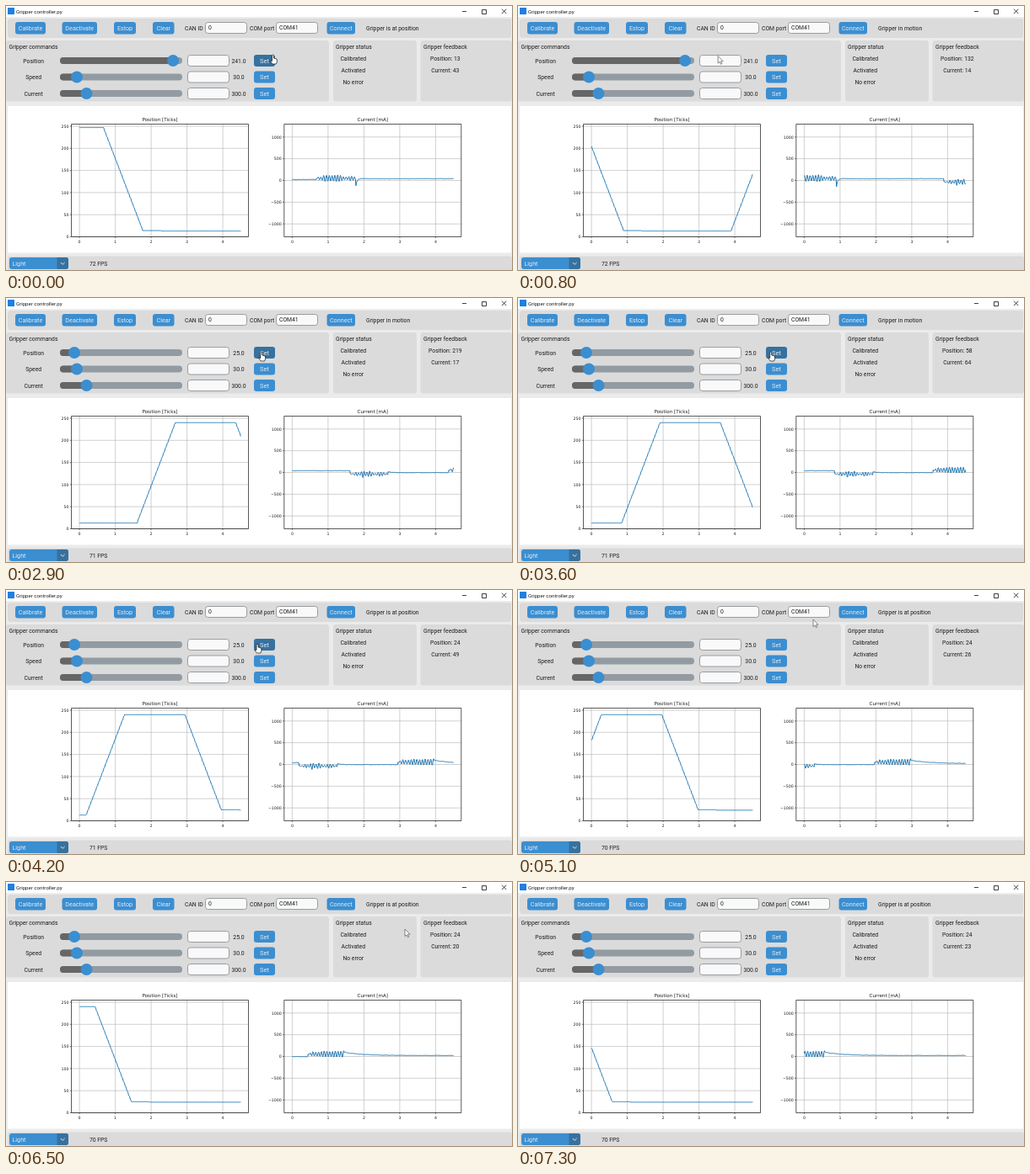
An HTML page with a canvas for the animation above (7.4 s loop, 600 by 314 pixels).

```html
<!DOCTYPE html>
<html lang="en">
<head>
<meta charset="utf-8">
<title>Gripper controller.py</title>
<style>
html, body { margin: 0; width: 100%; height: 100%; overflow: hidden; background: #ebebeb; }
canvas { display: block; width: 600px; height: 314px; }
</style>
</head>
<body>
<canvas id="stage"></canvas>
<script>
const W = 600, H = 314, LOOP = 7400, STEP = 100;
const UI = 'Roboto, sans-serif', PLOT = '"DejaVu Sans", sans-serif';
const BLUE = '#3b8ed0', DARK = '#36719f', INK = '#1c1c1c', PANEL = '#dbdbdb', PALE = '#e4ebf3';
const SCROLL = 1.09, SPAN = 4.5;   // plot units per second, visible plot units
const SPEED = 212, LAG = .04;      // ticks per plot unit, delay of the readings
const SLIDE_AT = 1800, POINTER_GONE = 6700;

const canvas = document.getElementById('stage');
const ctx = canvas.getContext('2d');
const dpr = window.devicePixelRatio || 1;
canvas.width = W * dpr;
canvas.height = H * dpr;

const mix = (a, b, k) => a + (b - a) * k;
const smooth = k => k * k * (3 - 2 * k);

function hash(n) {
  const v = Math.sin(n * 127.1 + 11.7) * 43758.5453;
  return v - Math.floor(v);
}

function noise(x) {
  const i = Math.floor(x);
  return 2 * mix(hash(i), hash(i + 1), x - i) - 1;
}

// Each move: start, goal, load while driving, load when holding, and a fading kick at the stop
const MOVES = [
  { at: -9, goal: 247, drive: 0, hold: 20, kick: 0, fade: 1 },
  { at: .67, goal: 14, drive: 50, hold: 40, kick: -200, fade: .03 },
  { at: 4.77, goal: 240, drive: -35, hold: -4, kick: 20, fade: .1 },
  { at: 7.52, goal: 25, drive: 55, hold: 22, kick: 75, fade: .5 }
];
MOVES.forEach((m, i) => {
  m.from = i ? MOVES[i - 1].goal : m.goal;
  m.end = m.at + Math.abs(m.goal - m.from) / SPEED;
});

const moveAt = s => MOVES.filter(m => m.at <= s).pop();

// The gripper advances in small jerks, then sags one tick after closing
function travel(s) {
  const m = moveAt(s), jerk = .05;
  if (s >= m.end) return m.goal - (m.goal < m.from && s > m.end + .5 ? 1 : 0);
  const q = (s - m.at) / jerk, i = Math.floor(q);
  const done = (i + smooth(q - i)) * jerk * SPEED;
  return m.from + Math.sign(m.goal - m.from) * Math.min(done, Math.abs(m.goal - m.from));
}

function load(s) {
  const m = moveAt(s), hum = 5 * noise(s / .04);
  if (s >= m.end) return m.hold + m.kick * Math.exp((m.end - s) / m.fade) + hum;
  const onset = Math.min(1, (s - m.at) / .15);
  const swing = 85 * (.55 + .45 * noise(s / .09)) * Math.sin(2 * Math.PI * s / .078);
  return m.drive + onset * swing + hum;
}

// Stops of the pointer: time, x, y
const POINTER = [[0, 316.5, 58], [300, 316.5, 58], [1600, 76, 62.5], [2000, 81, 62.5],
  [2700, 303, 64], [4200, 298, 64], [5100, 350, 35], [6500, 473, 56]];

function pointerAt(t) {
  if (t >= POINTER_GONE) return null;
  const i = Math.max(1, POINTER.findIndex(p => p[0] > t));
  const tail = t >= POINTER.at(-1)[0];
  const a = tail ? POINTER.at(-1) : POINTER[i - 1];
  const b = tail ? a : POINTER[i];
  const k = tail ? 0 : smooth((t - a[0]) / (b[0] - a[0]));
  return { x: mix(a[1], b[1], k), y: mix(a[2], b[2], k) };
}

function box(x, y, w, h, r, fill, stroke) {
  ctx.beginPath();
  ctx.roundRect(x, y, w, h, r);
  if (fill) { ctx.fillStyle = fill; ctx.fill(); }
  if (stroke) { ctx.strokeStyle = stroke; ctx.lineWidth = 1; ctx.stroke(); }
}

function text(str, x, y, { size = 6.8, align = 'left', fill = INK, font = UI } = {}) {
  ctx.font = `${size}px ${font}`;
  ctx.textAlign = align;
  ctx.fillStyle = fill;
  ctx.fillText(str, x, y);
}

function line(points, color, width) {
  ctx.beginPath();
  points.forEach(([x, y]) => ctx.lineTo(x, y));
  ctx.strokeStyle = color;
  ctx.lineWidth = width;
  ctx.stroke();
}

function within(p, x, y, w, h) {
  return p && p.x >= x && p.x <= x + w && p.y >= y && p.y <= y + h;
}

function button(label, x, y, w, h, p, size = 7.2) {
  const hot = within(p, x, y, w, h);
  box(x, y, w, h, 3, hot ? DARK : BLUE);
  text(label, x + w / 2, y + h / 2 + 2.6, { size, align: 'center', fill: PALE });
  return hot;
}

function entry(x, y, value = '') {
  box(x + .5, y + .5, 49, 13, 3, '#f9f9fa', '#979da2');
  text(value, x + 4, y + 9.4);
}

function slider(label, y, knob, value, p) {
  const hot = within(p, 64, y - 7, 145, 14);
  text(label, 32.7, y + 2.6, { align: 'center' });
  box(64, y - 4, 145, 8, 4, '#939ba2');
  box(64, y - 4, knob - 64, 8, 4, '#666');
  ctx.beginPath();
  ctx.arc(knob, y, 7, 0, Math.PI * 2);
  ctx.fillStyle = hot ? DARK : BLUE;
  ctx.fill();
  entry(215, y - 7);
  text(value.toFixed(1), 276, y + 2.6, { align: 'center' });
  const set = button('Set', 294, y - 7, 25, 14, p, 7.5);
  return hot || set;
}

function titleBar() {
  box(0, 0, W, 13, 0, '#fff');
  box(2, 2, 8, 8, 0, '#1f7fe0');
  text('Gripper controller.py', 12, 8.6, { size: 6.1 });
  line([[541, 6.5], [546, 6.5]], '#111', .8);
  ctx.strokeRect(564.5, 4.5, 5, 5);
  line([[588, 3.7], [593.3, 9]], '#111', .8);
  line([[593.3, 3.7], [588, 9]], '#111', .8);
}

function toolbar(s, p) {
  box(2, 15, 597, 23, 3, PANEL);
  const hot = [['Calibrate', 11, 36], ['Deactivate', 66.5, 41.5], ['Estop', 128, 26],
    ['Clear', 174, 25.5], ['Connect', 380.5, 33.5]]
    .map(([name, x, w]) => button(name, x, 19, w, 14.5, p));
  text('CAN ID', 212, 28.6);
  entry(236, 19, '0');
  text('COM port', 289, 28.6);
  entry(320, 19, 'COM41');
  text('Gripper ' + (s < moveAt(s).end ? 'in motion' : 'is at position'), 427, 28.6);
  return hot.some(Boolean);
}

function panels(t, s, p) {
  box(0, 41, 383, 72.5, 3, PANEL);
  box(388, 41, 99, 72.5, 3, PANEL);
  box(491.5, 41, 108.5, 72.5, 3, PANEL);
  text('Gripper commands', 3.5, 50.6);
  text('Gripper status', 391, 50.6);
  text('Gripper feedback', 495, 50.6);
  const rows = (list, x) => list.forEach((row, i) =>
    text(row, x, 64.8 + i * 14.1, { align: 'center' }));
  rows(['Calibrated', 'Activated', 'No error'], 411.8);
  rows(['Position: ' + Math.round(travel(s)), 'Current: ' + Math.round(load(s))], 520.8);

  const goal = t < SLIDE_AT ? 241 : 25;
  return [
    slider('Position', 65, 67.5 + goal * .5417, goal, p),
    slider('Speed', 84.5, 84, 30, p),
    slider('Current', 104, 95.5, 300, p)
  ].some(Boolean);
}

function chart({ left, title, min, max, step, zero, scale, fn }, offset) {
  const top = 140.5, bottom = 274.5, width = 210, x0 = left + 9.6, unit = 42.5;
  const yOf = v => zero - v * scale;
  const label = { size: 4.7, font: PLOT };
  for (let i = 0; i <= SPAN; i++) {
    const x = x0 + i * unit;
    line([[x, top], [x, bottom]], '#b0b0b0', .6);
    line([[x, bottom], [x, bottom + 1.7]], '#000', .5);
    text(i, x, 281.9, { ...label, align: 'center' });
  }
  for (let v = min; v <= max; v += step) {
    const y = yOf(v);
    line([[left, y], [left + width, y]], '#b0b0b0', .6);
    line([[left - 1.7, y], [left, y]], '#000', .5);
    text(String(v).replace('-', '\u2212'), left - 3, y + 1.8, { ...label, align: 'right' });
  }
  const curve = [];
  for (let x = 0; x <= SPAN; x += .012) curve.push([x0 + x * unit, yOf(fn(offset + x))]);
  ctx.lineJoin = 'round';
  line(curve, '#1f77b4', 1);
  ctx.strokeStyle = '#000';
  ctx.lineWidth = .65;
  ctx.strokeRect(left, top, width, bottom - top);
  text(title, left + width / 2, 137.2, { size: 5.6, align: 'center', font: PLOT });
}

const CHARTS = [
  { left: 77.5, title: 'Position [Ticks]', min: 0, max: 250, step: 50,
    zero: 274.5, scale: .526, fn: travel },
  { left: 329.8, title: 'Current [mA]', min: -1000, max: 1000, step: 500,
    zero: 207.5, scale: .0517, fn: load }
];

function footer(t) {
  box(2, 297.5, 598, 18, 3, PANEL);
  box(4, 299, 70, 14, 3, BLUE);
  box(60.5, 299, 13.5, 14, [0, 3, 3, 0], DARK);
  text('Light', 7.5, 308.6, { size: 7.2, fill: PALE });
  line([[64.8, 305], [67.2, 307.4], [69.6, 305]], PALE, 1);
  text(Math.round(71.8 - t / 3600) + ' FPS', 99, 308.6);
}

function pointer(p, hand) {
  const shape = hand
    ? [[-1, .8], [0, 0], [1, .8], [1, 4], [4.6, 5], [5, 8], [3.8, 11], [-.6, 11], [-3.4, 7.2], [-1, 7.4]]
    : [[0, 0], [0, 8.6], [2, 6.8], [3.4, 9.8], [4.7, 9.2], [3.4, 6.3], [6, 6.1]];
  ctx.beginPath();
  shape.forEach(([x, y]) => ctx.lineTo(p.x + x, p.y + y));
  ctx.closePath();
  ctx.fillStyle = '#fff';
  ctx.fill();
  ctx.strokeStyle = hand ? '#111' : '#555';
  ctx.lineWidth = .7;
  ctx.stroke();
}

function draw(t) {
  const offset = SCROLL * t / 1000, now = offset + SPAN - LAG;
  const p = pointerAt(t);
  ctx.setTransform(dpr, 0, 0, dpr, 0, 0);
  box(0, 0, W, H, 0, '#ebebeb');
  titleBar();
  const overBar = toolbar(now, p);
  const overPanel = panels(t, now, p);
  box(2, 119, 597, 174.5, 0, '#fff');
  CHARTS.forEach(c => chart(c, offset));
  footer(t);
  if (p) pointer(p, overBar || overPanel);
}

const start = performance.now();
function tick() {
  const t = (performance.now() - start) % LOOP;
  draw(Math.floor(t / STEP) * STEP);
  requestAnimationFrame(tick);
}
tick();
</script>
</body>
</html>
```
